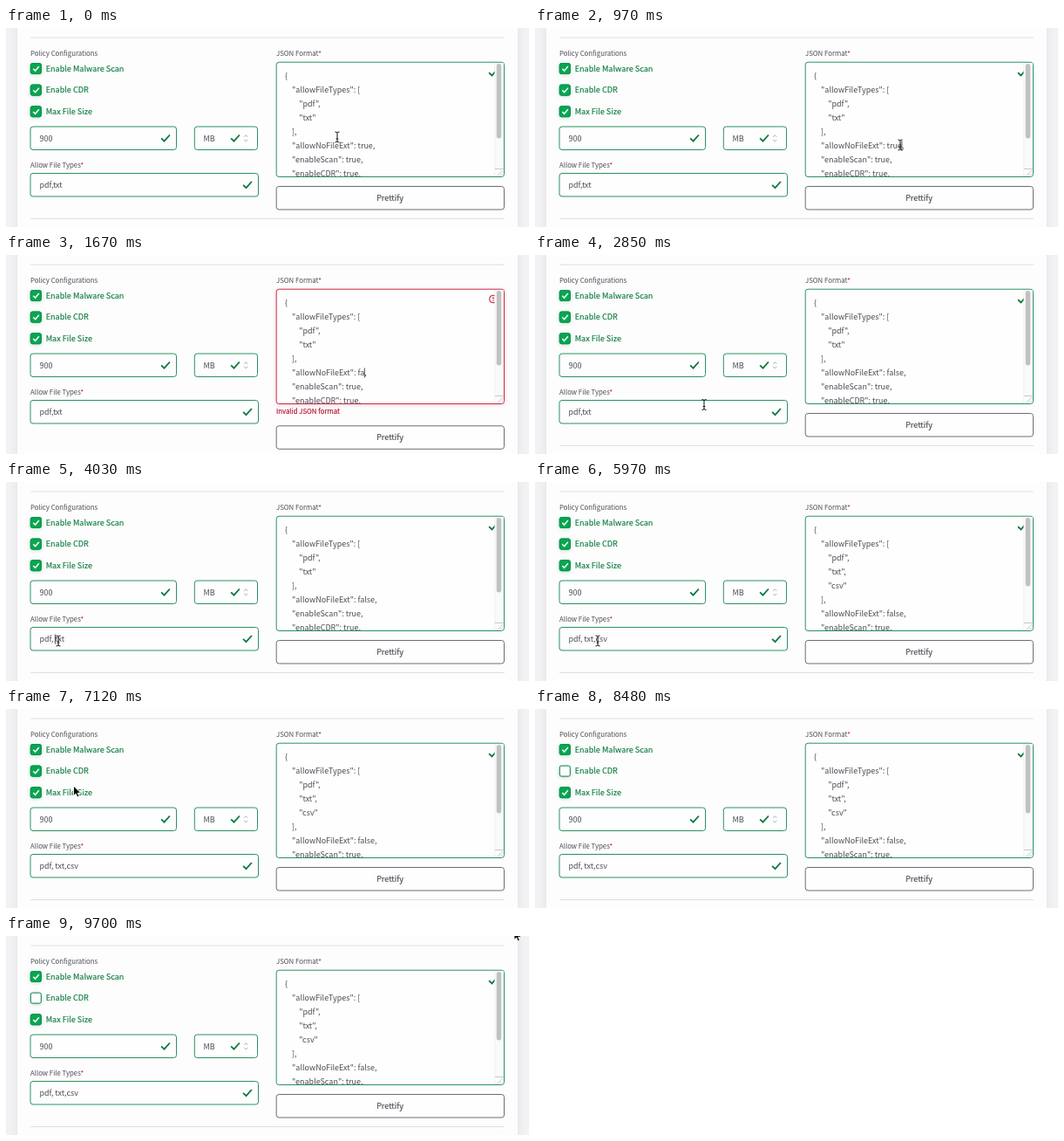
Recreate the animation shown at these times as an HTML page. Size 600 px wide and 228 px high, loop 9.73 s.

```html
<!DOCTYPE html>
<html lang="en">
<head>
<meta charset="utf-8">
<title>Policy form</title>
<style>
  html, body { margin: 0; width: 100%; height: 100%; overflow: hidden; background: #f2f2f4; }
  svg { display: block; width: 600px; height: 228px; }
  text { font: 9px "Noto Sans CJK JP", "Noto Sans CJK SC", "Noto Sans CJK", "Open Sans", sans-serif; fill: #4b4b55; white-space: pre; }
  .small { font-size: 7.8px; }
  .medium { stroke: currentColor; stroke-width: .15; }
  .label { font-size: 9.08px; fill: #0b7a3e; color: #0b7a3e; }
  .error, .star { fill: #b80d2c; color: #b80d2c; }
  .card { fill: #fdfdfe; filter: drop-shadow(0 0 4px rgba(0, 0, 0, .07)); }
  .box { fill: #fefefe; stroke: #2a9160; stroke-width: 1; }
  .box.bad { stroke: #c62e48; filter: drop-shadow(0 1px 2px rgba(189, 18, 48, .2)); }
  .tick { fill: none; stroke: #0b7a3e; stroke-width: 1.8; }
  .alert { fill: none; stroke: #c0223d; stroke-width: 1.1; }
  .rule { stroke: #dfdfe3; }
  .caret { stroke: #222; stroke-width: .8; }
  .check { filter: drop-shadow(0 1px 2px rgba(8, 130, 70, .25)); }
</style>
</head>
<body>
<svg viewBox="0 0 600 228">
  <defs>
    <path id="tick" class="tick" d="M-4.9 .4L-1.5 3.7 4.9-3.5"/>
    <g id="alert" class="alert"><circle r="4.3"/><path d="M0-2.5V.6M0 1.5V2.7"/></g>
    <clipPath id="inner"><path d="M311 40H560.5V170H311Z"/></clipPath>
  </defs>
  <path class="card" d="M13 -20H587V248H13Z"/>
  <path class="rule" d="M28 11H572"/>
  <path class="rule" id="bottomRule" d="M28 218.5H572"/>

  <text class="small" x="28" y="32">Policy Configurations</text>
  <g id="checks"></g>

  <rect class="box" x="28" y="113" width="167.5" height="26.5" rx="3"/>
  <text x="38.5" y="129.7">900</text>
  <use href="#tick" x="183" y="126"/>
  <rect class="box" x="216.3" y="113" width="72.2" height="26.5" rx="3"/>
  <text x="226.5" y="129.7">MB</text>
  <use href="#tick" x="263" y="126"/>
  <path d="M273.2 124.8L275.2 122.6 277.2 124.8M273.2 127.8L275.2 130 277.2 127.8" fill="none" stroke="#b0b0b6"/>

  <text class="small" x="28" y="160">Allow File Types<tspan class="star">*</tspan></text>
  <rect class="box" id="typesBox" x="28" y="166.5" width="261.5" height="26.5" rx="3"/>
  <text id="types" x="38.5" y="183" style="font-size: 8.9px"></text>
  <use href="#tick" id="typesTick" x="277" y="179.5"/>
  <g id="typesError">
    <use href="#alert" x="277" y="179.5"/>
    <text class="small medium error" x="28" y="203.6">The File Types Whitelist field format is invalid</text>
  </g>

  <text class="small" x="310" y="32">JSON Format<tspan class="star">*</tspan></text>
  <rect class="box" id="jsonBox" x="310.2" y="39.2" width="261.3" height="131.3" rx="3"/>
  <path d="M561 40H570.8V161.5H561Z" fill="#fafafa"/>
  <path d="M560.8 40V170" stroke="#e6e6e8" stroke-width=".6"/>
  <rect id="thumb" x="562.8" y="41" width="5.4" rx="2.7" fill="#c1c1c1"/>
  <path d="M561 161.5H570.5M563.5 169.5L570 163M567 169.5L570 166.5" stroke="#b0b0b0" stroke-width=".7"/>
  <g clip-path="url(#inner)">
    <g id="json"></g>
    <use href="#tick" id="jsonTick" x="559" y="50.7"/>
    <use href="#alert" id="jsonAlert" x="559" y="50.5"/>
  </g>
  <text class="small medium error" id="jsonError" x="310" y="182">Invalid JSON format</text>

  <g id="button">
    <rect x="310.2" y="181.5" width="261.3" height="26.5" rx="3" fill="#fefefe" stroke="#6c6c75"/>
    <text class="medium" x="440.5" y="198" text-anchor="middle" color="#4b4b55">Prettify</text>
  </g>

  <path id="caret" class="caret"/>
  <g id="mouse">
    <path id="beam" d="M-2.5-6Q0-6 0-4.5Q0-6 2.5-6M0-4.5V4.5M-2.5 6Q0 6 0 4.5Q0 6 2.5 6M-1.3 2H1.3" fill="none" stroke="#111"/>
    <path id="arrow" d="M0 0V11.3L2.6 8.9 4.4 13 6.4 12.1 4.7 8.2H8.2Z" stroke="#fff" stroke-width=".9"/>
  </g>
</svg>
<script>
const LOOP = 9730;
const $ = id => document.getElementById(id);
const show = (id, on) => $(id).setAttribute('visibility', on ? 'inherit' : 'hidden');
const latest = (steps, t) => steps.filter(s => s[0] <= t).pop();

// [time, text, caret index]
const flagSteps = [
  [0, 'true'], [700, 'true', 4], [1040, 'tru', 3], [1130, 'tr', 2], [1220, 't', 1], [1310, '', 0],
  [1500, 'f', 1], [1640, 'fa', 2], [1740, 'fal', 3], [1870, 'fals', 4], [2060, 'false', 5], [3400, 'false']
];
const typeSteps = [
  [0, 'pdf,txt'], [3400, 'pdf,txt', 4], [3650, 'pdf, txt', 5], [4300, 'pdf, txt', 8], [4600, 'pdf, txt,', 9],
  [4980, 'pdf, txt,c', 10], [5120, 'pdf, txt,cs', 11], [5260, 'pdf, txt,csv', 12], [7650, 'pdf, txt,csv']
];
// [time, x, y]
const mousePath = [
  [0, 380, 125], [250, 381, 125], [700, 419, 134], [2250, 419, 134], [2850, 194, 171.5], [3350, 56, 182],
  [3900, 56, 182], [4300, 72, 182], [6400, 72, 182], [7120, 77.5, 88], [7450, 35, 70], [7850, 35, 70],
  [8250, -12, -14], [8800, 575, -20], [8950, 578, -8], [9700, 583, -7], [LOOP, 583, -7]
];
const typing = [[1040, 2250], [3650, 3900], [4600, 5700]];

$('checks').innerHTML = ['Enable Malware Scan', 'Enable CDR', 'Max File Size'].map((label, i) => {
  const y = 40.5 + i * 24.6;
  return `<rect class="check" x="28.3" y="${y}" width="12" height="12" rx="2" fill="#fefefe" stroke="#0c7c43"/>
    <g id="check${i}"><rect x="28.3" y="${y}" width="12" height="12" rx="2" fill="#08a651" stroke="#079548"/>
    <path d="M31.3 ${y + 6.2}l2.3 2.4 4.2-5" fill="none" stroke="#fff" stroke-width="1.5"/></g>
    <text class="medium label" x="45.7" y="${y + 9.2}">${label}</text>`;
}).join('');

$('json').innerHTML = Array.from({ length: 8 }, (_, i) => `<text x="320" y="${58 + i * 15.98}"></text>`).join('');
const lines = [...$('json').children];

function placeCaret(text, index, blinkStart, t) {
  const on = index !== undefined && (t - blinkStart) % 1000 < 500;
  if (!on) return;
  const x = +text.getAttribute('x') + (index ? text.getSubStringLength(0, index) : 0);
  $('caret').setAttribute('d', `M${x} ${text.getAttribute('y') - 8.5}v11`);
  show('caret', true);
}

function moveMouse(t) {
  const i = mousePath.findIndex(p => p[0] > t);
  const [t0, x0, y0] = mousePath[i - 1], [t1, x1, y1] = mousePath[i];
  const u = (t - t0) / (t1 - t0), k = u * u * (3 - 2 * u);
  const x = x0 + (x1 - x0) * k, y = y0 + (y1 - y0) * k;
  const inside = (l, top, r, b) => x > l && x < r && y > top && y < b;
  const overText = inside(310, 39, 560, 170) || inside(28, 166, 290, 193) || inside(28, 113, 196, 139);
  $('mouse').setAttribute('transform', `translate(${x} ${y})`);
  show('mouse', !typing.some(([a, b]) => t >= a && t < b));
  show('beam', overText);
  show('arrow', !overText);
}

function draw(t) {
  const [flagTime, flag, flagCaret] = latest(flagSteps, t);
  const [typeTime, types, typeCaret] = latest(typeSteps, t);
  const badJson = t >= 1040 && t < 2060;
  const badTypes = t >= 4600 && t < 4980;

  // The JSON follows the field after a short delay.
  const names = latest(typeSteps, Math.max(0, t - 70))[1].split(',').map(s => s.trim()).filter(Boolean);
  const prefix = '    "allowNoFileExt": ';
  const content = ['{', '    "allowFileTypes": [',
    ...names.map((n, i) => `        "${n}"${i < names.length - 1 ? ',' : ''}`),
    '    ],', `${prefix}${flag},`, '    "enableScan": true,', '    "enableCDR": true,'];
  lines.forEach((line, i) => line.textContent = content[i]);
  $('thumb').setAttribute('height', names.length > 2 ? 78.5 : 85.5);
  $('types').textContent = types;

  $('jsonBox').classList.toggle('bad', badJson);
  $('typesBox').classList.toggle('bad', badTypes);
  show('jsonTick', !badJson);
  show('jsonAlert', badJson);
  show('jsonError', badJson);
  show('typesTick', !badTypes);
  show('typesError', badTypes);
  show('bottomRule', !badJson && !badTypes);
  show('check1', t < 7650);
  $('button').setAttribute('transform', `translate(0 ${badJson ? 14.3 : 0})`);

  show('caret', false);
  placeCaret(lines[5], flagCaret === undefined ? undefined : prefix.length + flagCaret, flagTime, t);
  placeCaret($('types'), typeCaret, typeTime, t);
  moveMouse(t);
}

const start = performance.now();
function tick() {
  draw((performance.now() - start) % LOOP);
  requestAnimationFrame(tick);
}
tick();
</script>
</body>
</html>
```
